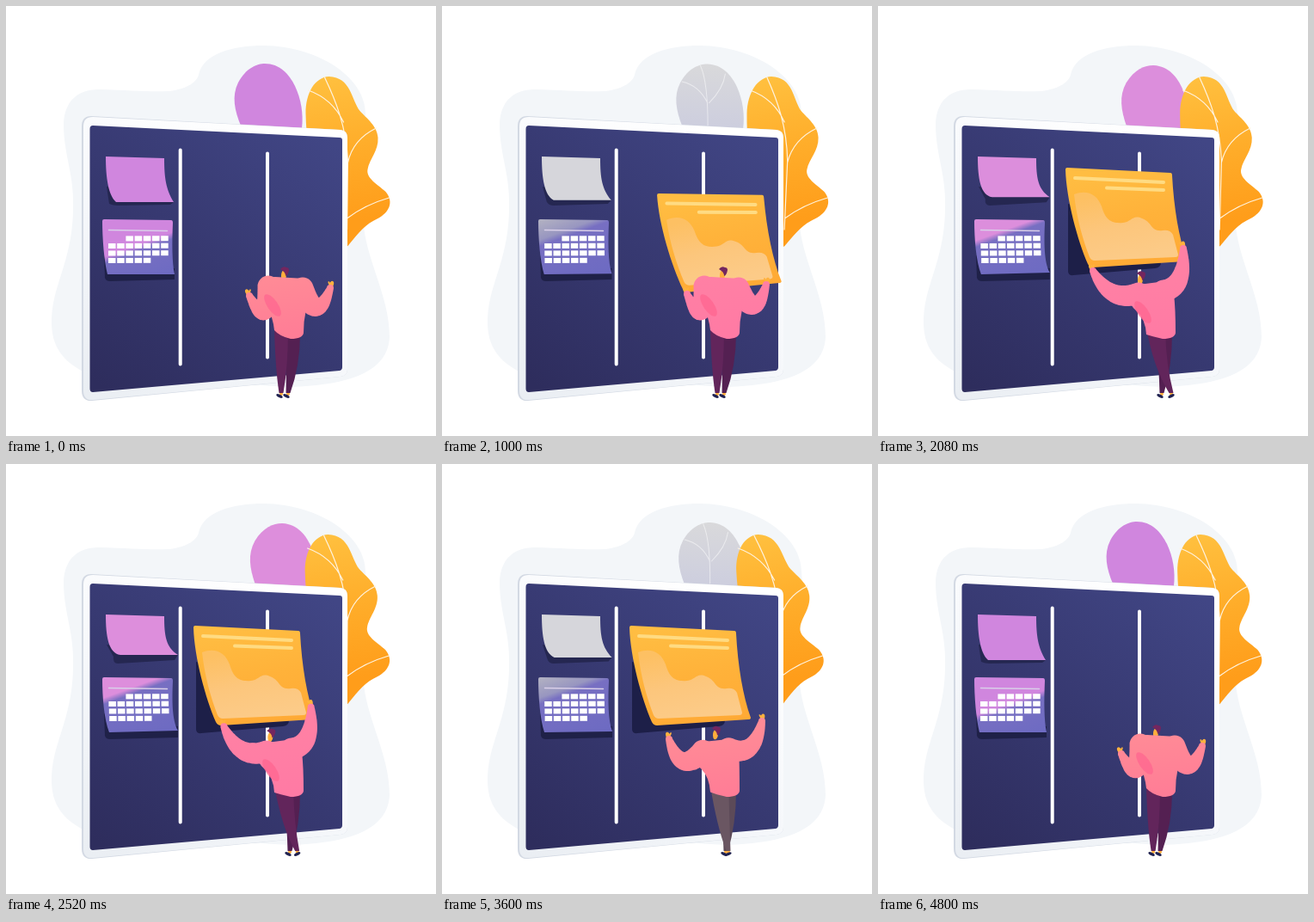
Animation of 500 by 500 pixels, one loop 4.84 s. Source, as an HTML page with a canvas:

```html
<!DOCTYPE html>
<html lang="en">
<head>
<meta charset="utf-8">
<title>Planning board</title>
<style>
html, body { margin: 0; width: 100%; height: 100%; overflow: hidden; background: #fff; }
canvas { display: block; width: 500px; height: 500px; }
</style>
</head>
<body>
<canvas id="stage" width="500" height="500"></canvas>
<script>
const ctx = document.getElementById('stage').getContext('2d');
const LOOP = 4840, STEP = 40;

const lerp = (a, b, k) => a + (b - a) * k;
const mixList = (a, b, k) => a.map((v, i) => lerp(v, b[i], k));
const ramp = (t, a, b) => Math.min(1, Math.max(0, (t - a) / (b - a)));
const ease = k => k * k * (3 - 2 * k);
const bump = (t, a, b, c, d) => ease(ramp(t, a, b)) * (1 - ease(ramp(t, c, d)));
const rgb = color => `rgb(${color.map(Math.round)})`;
const mixColor = (a, b, k) => rgb(mixList(a, b, k));

function gradient(x0, y0, x1, y1, ...colors) {
  const g = ctx.createLinearGradient(x0, y0, x1, y1);
  colors.forEach((c, i) => g.addColorStop(i / (colors.length - 1), c));
  return g;
}

function fill(path, color) {
  ctx.fillStyle = color;
  ctx.fill(new Path2D(path));
}

function stroke(path, color, width) {
  ctx.strokeStyle = color;
  ctx.lineWidth = width;
  ctx.lineCap = 'round';
  ctx.stroke(new Path2D(path));
}

function ellipse(x, y, rx, ry, angle, color) {
  ctx.beginPath();
  ctx.ellipse(x, y, rx, ry, angle, 0, Math.PI * 2);
  ctx.fillStyle = color;
  ctx.fill();
}

function drawBackdrop() {
  fill('M100 430C65 415 53 395 53 368C53 325 76 300 78 240C80 195 67 175 67 137C68 112 82 97 108 97' +
    'C145 98 165 100 190 99C212 96 222 88 224 80C229 56 262 46 300 46C365 47 418 84 418 125' +
    'C422 170 414 205 415 245C417 295 446 335 446 385C444 425 400 441 330 443Z', '#f3f6f9');
}

function drawLeaves(sway, swing, grey, purple) {
  ctx.save();
  ctx.translate(310, 420 + 2 * sway);
  ctx.rotate(0.059 * sway);
  ctx.translate(-310, -420);
  fill('M273 139C266 122 262 105 270 89C279 72 292 67 301 67C318 67 329 79 336 93' +
    'C343 108 346 125 344 142L340 165L285 165Z',
    gradient(0, 67, 0, 140, mixColor(purple, [217, 217, 219], grey), mixColor(purple, [205, 206, 222], grey)));
  stroke('M293 69Q302 88 303 138M272 88Q292 92 302 112M322 78Q320 95 304 112',
    `rgba(255,255,255,${0.5 * grey})`, 1);
  ctx.restore();

  ctx.save();
  ctx.transform(1, 0, -0.034 * swing, 1, 10.5 * swing - 0.5, 0);
  fill('M376 82C360 83 349 100 349 125C350 180 365 240 385 288L398 279C412 262 418 254 433 247' +
    'C446 240 452 228 442 216C432 207 419 200 421 190C423 178 434 168 433 153' +
    'C432 139 420 131 412 122C402 109 402 83 376 82Z',
    gradient(375, 82, 405, 250, '#ffc03f', '#ffad2a', '#ff9d1a'));
  stroke('M371 83C384 110 396 140 398 180L397 260M352 98Q380 108 393 135' +
    'M431 142Q404 155 398 182M446 223Q418 231 397 247', '#fff3df', 1.2);
  ctx.restore();
}

function drawBoard() {
  fill('M88 140Q88 128 99 128L389 144Q397 145 397 153L397 422Q397 430 389 431L100 459Q88 460 88 447Z',
    '#d3d9e3');
  fill('M90 140Q90 129 101 129L389 144Q397 145 397 153L397 422Q397 430 389 431L101 458Q90 459 90 447Z',
    gradient(90, 450, 290, 130, '#eaeef3', '#f6f8fb', '#ffffff'));
  fill('M97.5 143Q97.5 139 101 139L388 153Q391 153 391 156L391 420Q391 423 388 424L101 449Q97.5 449 97.5 445Z',
    gradient(120, 450, 370, 150, '#2e2d5d', '#373971', '#414685'));
  stroke('M202.7 167.5V416.5M304 171.5V408.5', '#ffffff', 4);
}

function drawSmallNotes(sway, grey, purple) {
  const right = lerp(195, 200, sway), low = lerp(228, 222, sway), left = lerp(128, 133, sway);
  fill(`M117 210L${left - 8} ${low + 2}Q124 232 130 232L${right - 4} ${lerp(231, 228, sway)}L${right} ${low}Z`,
    '#252751');
  fill(`M116 175L184 177C184 200 186 213 ${right} ${low}L${left} ${low}C119 220 116 200 116 175Z`,
    mixColor(purple, [214, 214, 219], grey));

  const calRight = lerp(196, 200, sway), calLow = lerp(312, 310, sway);
  fill(`M114 290L115 316Q116 320 121 320L${calRight} 318L${calRight} 305Z`, '#1f2148');
  const tint = ctx.createLinearGradient(113, 249, 144, 334);
  const edge = lerp(0.53, 0.32, Math.max(sway, grey));
  tint.addColorStop(0, mixColor(purple, [178, 177, 194], grey));
  tint.addColorStop(edge - 0.08, mixColor(purple, [152, 150, 192], grey));
  tint.addColorStop(edge, '#776fc2');
  tint.addColorStop(1, '#6c6ac2');
  fill(`M114 248L192 249Q194 249 194 252C193 275 193 298 ${calRight} ${calLow}` +
    `L${lerp(118, 120, sway)} 312C114 297 112 270 112 250Q112 248 114 248Z`, tint);
  stroke('M119.5 260.5L187.5 261.5', '#d9cfe8', 1.4);

  ctx.fillStyle = '#ffffff';
  for (let row = 0; row < 4; row++) {
    for (let col = row ? 0 : 2; col < (row < 3 ? 7 : 5); col++) {
      ctx.fillRect(119 + col * 10.2 + row * 0.4 * sway, 267.5 + row * 8.5 - col * 0.05, 8.5, 6);
    }
  }
}

function drawBigNote(t) {
  const alpha = ramp(t, 480, 800) * (1 - ramp(t, 4040, 4520));
  if (!alpha) return;
  const placed = ease(ramp(t, 1000, 1720));
  const lift = 1 - ease(ramp(t, 480, 900));
  ctx.save();
  ctx.globalAlpha = alpha * ramp(t, 1400, 1760);
  fill('M221 230L221 308Q221 314 227 313L322 305Q329 304 329 298L280 250Z', '#1d1f48');
  ctx.globalAlpha = alpha;
  ctx.translate(lerp(250, 218, placed), lerp(218, 188, placed) + 14 * lift);
  ctx.rotate(-0.035 * (1 - placed));
  ctx.translate(-218, -188);
  fill('M220 188L340 194Q342 194 342 197C344 235 350 270 359 295Q359 297 356 297L250 304Q246 304 244 300' +
    'C232 272 219 225 218 190Q218 188 220 188Z',
    gradient(270, 190, 290, 304, '#ffbd42', '#ffb23a', '#ffaa35'));
  fill('M228 219C243 213 255 219 260 233C265 250 272 253 285 252C295 251 296 242 307 247' +
    'C319 251 317 263 331 261Q340 260 343 266L349 289Q349 292 346 292L252 296Q248 296 246 292C238 271 231 247 228 219Z',
    gradient(270, 218, 285, 296, '#fdc063', '#fcc67c', '#fccb88'));
  stroke('M229 200L332 205M266 211.5L332 214', '#ffdb82', 4);
  ctx.restore();
}

// Wrists, feet and head lead; shoulders and elbows follow from them.
const shrug = { left: [283, 337], right: [377, 328], feet: [320, 328], head: 324, lean: 0 };
const carry = { left: [285, 335], right: [377, 324], feet: [320, 328], head: 327, lean: 0 };
const reach = { left: [250, 308], right: [355, 282], feet: [341, 330], head: 306, lean: 1 };
const smooth = { left: [260, 300], right: [354, 284], feet: [334, 330], head: 313, lean: 1 };
const release = { left: [264, 320], right: [372, 299], feet: [333, 330], head: 319, lean: 0.9 };
const settle = { ...shrug, left: [278, 336], feet: [326, 329] };
const timeline = [[0, shrug], [1000, carry], [1720, reach], [2240, reach], [2960, smooth],
  [3600, release], [4280, settle], [LOOP, shrug]];

function poseAt(t) {
  const next = timeline.findIndex(([at]) => at > t);
  const [from, a] = timeline[next - 1], [to, b] = timeline[next];
  const k = ease(ramp(t, from, to));
  return {
    left: mixList(a.left, b.left, k), right: mixList(a.right, b.right, k),
    feet: mixList(a.feet, b.feet, k),
    head: lerp(a.head, b.head, k), lean: lerp(a.lean, b.lean, k)
  };
}

function drawArm([sx, sy], [wx, wy], color) {
  const dx = wx - sx, dy = wy - sy, side = Math.sign(dx), reachLength = Math.hypot(dx, dy);
  // The elbow sags between straight down and square to the arm, less when the arm is stretched.
  const bend = Math.max(8, 33 - reachLength / 3);
  const cx = (sx + wx) / 2 - bend * side * dy / reachLength;
  const cy = (sy + wy) / 2 + bend * (1 + Math.abs(dx) / reachLength);

  const angle = Math.atan2(wy - cy, wx - cx);
  const hx = wx + 4 * Math.cos(angle), hy = wy + 4 * Math.sin(angle);
  ellipse(hx, hy, 4.6, 2.4, angle, '#ffb23e');
  ellipse(hx - side * 2, hy - 1, 3.4, 1.1, angle - side * 0.8, '#ffb23e');

  ctx.beginPath();
  for (let i = 0; i <= 60; i++) {
    const s = i / 60, r = 1 - s;
    const x = r * r * sx + 2 * r * s * cx + s * s * wx;
    const y = r * r * sy + 2 * r * s * cy + s * s * wy;
    const radius = 4 + 8.5 * (1 - s * s);
    ctx.moveTo(x + radius, y);
    ctx.arc(x, y, radius, 0, Math.PI * 2);
  }
  ctx.fillStyle = color;
  ctx.fill();
}

function drawLeg(x0, x1, top, knee, foot, turn, color) {
  ellipse(foot, 451, 2, 2, 0, '#ffad3b');
  ellipse(foot - 1 + turn, 453.5, 4, 1.7, -0.45 * turn, '#202250');
  fill(`M${x0} ${top}L${x1} ${top + 3}Q${knee + 8} 418 ${foot + 2.5} 450L${foot - 2.5} 450` +
    `Q${knee - 7} 420 ${x0} ${top}Z`, color);
}

function drawTorso([lx, ly], [rx, ry], lean, color) {
  fill(`M${lx - 11} ${ly + 3}Q${lx - 8} ${ly - 11} ${lx + 8} ${ly - 11}L${rx + 2} ${ry - 11}` +
    `Q${rx + 13} ${ry - 6} ${rx + 12} ${ry + 4}Q346 352 346 380Q345 387 331 387` +
    `Q318 384 312 ${377 + 5 * lean}Q311 364 ${lx - 2} ${ly + 21}Q${lx - 11} ${ly + 14} ${lx - 11} ${ly + 3}Z`, color);
}

function drawMan(t, dull) {
  const { left, right, feet, head, lean } = poseAt(t);
  const shoulderL = mixList([305, 326], [303, 334], lean);
  const shoulderR = mixList([345, 328], [332, 331], lean);

  drawLeg(322, 342, 378, 334, feet[1], -1, mixColor([84, 32, 82], [92, 74, 88], dull));
  drawLeg(312, lerp(328, 334, lean), 374, lerp(320, 327, lean), feet[0], lerp(-1, 1, lean),
    mixColor([98, 37, 91], [106, 86, 98], dull));

  const top = 307 + 5 * ramp(324 - head, 0, 18);
  ellipse(head - 1, top + 6, 3, 6, 0.1, '#ffae3c');
  fill(`M${head - 5} ${top - 1}Q${head - 2} ${top - 5} ${head + 2} ${top - 3}Q${head + 5} ${top - 3} ${head + 5} ${top}` +
    `Q${head + 4} ${top + 6} ${head + 1} ${top + 7}Q${head + 1} ${top + 2} ${head - 5} ${top - 1}Z`, '#73265f');

  const pink = bump(t, 400, 1000, 3000, 3500);
  const shirt = gradient(320, 312, 330, 388,
    mixColor([255, 139, 150], [255, 128, 164], pink), mixColor([255, 124, 150], [255, 122, 164], pink));
  drawArm(shoulderL, left, shirt);
  drawArm(shoulderR, right, shirt);
  drawTorso(shoulderL, shoulderR, lean, shirt);
  ellipse(shoulderL[0] + 5, shoulderL[1] + 22, 6, 15, -0.6, `rgba(255,100,142,${0.7 * (1 - dull)})`);
}

function draw(t) {
  const phase = t / LOOP * Math.PI * 2;
  const sway = (1 - Math.cos(phase)) / 2;
  const dull = bump(t, 3240, 3440, 3760, 3960);
  const grey = dull + bump(t, 520, 720, 1300, 1560);
  const purple = mixList([208, 134, 222], [221, 142, 220], sway);
  ctx.fillStyle = '#ffffff';
  ctx.fillRect(0, 0, 500, 500);
  drawBackdrop();
  drawLeaves(sway, Math.sin(phase), grey, purple);
  drawBoard();
  drawSmallNotes(sway, grey, purple);
  drawBigNote(t);
  drawMan(t, dull);
}

const start = performance.now();
function tick() {
  const t = Math.max(0, performance.now() - start) % LOOP;
  draw(Math.floor(t / STEP) * STEP);
  requestAnimationFrame(tick);
}
tick();
</script>
</body>
</html>
```
